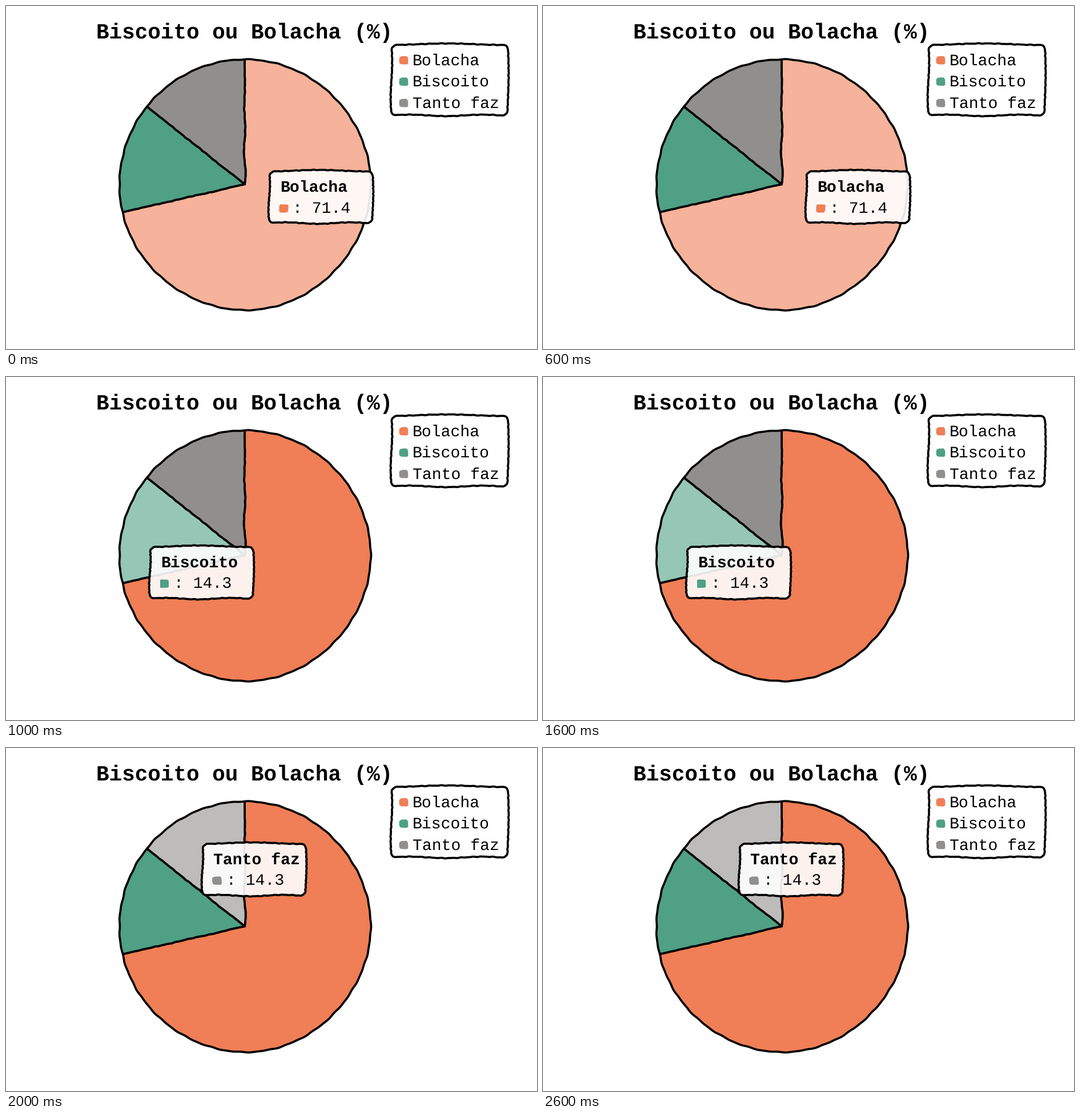
Animation, 930 px wide and 602 px high, one loop 3000 ms. Source, as a matplotlib script:

```python
import numpy as np
import matplotlib.pyplot as plt
from matplotlib.animation import FuncAnimation
from matplotlib.colors import to_rgb
from matplotlib.patches import Polygon

W, H, DPI = 930, 602, 64
PX = 72 / DPI  # points per pixel
LINE = 3.7
CX, CY, R = 418, 313, 219
TAU = 2 * np.pi

plt.rcParams["toolbar"] = "None"
plt.rcParams["text.hinting"] = "no_hinting"
fig = plt.figure(figsize=(W / DPI, H / DPI), dpi=DPI, facecolor="white")
ax = fig.add_axes([0, 0, 1, 1])
ax.set_xlim(0, W)
ax.set_ylim(H, 0)
ax.axis("off")


def shape(points, face, outlined=True):
    return ax.add_patch(Polygon(points, closed=True, facecolor=face, joinstyle="round",
                                edgecolor="black" if outlined else "none",
                                linewidth=LINE * PX if outlined else 0))


def write(text, x, y, size=28.15, weight="normal"):
    return ax.text(x, y, text, family="Liberation Mono", weight=weight,
                   size=size * PX, va="baseline", zorder=1)


# --- Hand-drawn shapes ---

def tremble(t):
    return 0.3 * np.sin(70 * t) + 0.2 * np.sin(113 * t)


def box(x0, y0, x1, y1, alpha=1.0, r=9):
    """Rounded box whose four sides wave gently."""
    a = np.linspace(0, TAU, 81)
    cx = np.where(np.cos(a) > 0, x1 - r, x0 + r)
    cy = np.where(np.sin(a) > 0, y1 - r, y0 + r)
    ring_x, ring_y = cx + r * np.cos(a), cy + r * np.sin(a)
    # even steps put enough points on the straight sides to bend them
    dist = np.r_[0, np.cumsum(np.hypot(np.diff(ring_x), np.diff(ring_y)))]
    s = np.arange(0, dist[-1])
    x, y = np.interp(s, dist, ring_x), np.interp(s, dist, ring_y)
    u, v = (x - x0) / (x1 - x0), (y - y0) / (y1 - y0)
    dx = (1 - u) * np.sin(TAU * v) + u * np.sin(4 * v)
    dy = (1 - v) * np.cos(6.6 * u) - v * np.sin(10 * u)
    points = np.column_stack([x + 1.3 * dx + tremble(v), y + 1.3 * dy + tremble(u)])
    return shape(points, (1, 1, 1, alpha))


def swatch(cx, cy, color, rx=7.4, ry=7.2):
    a = np.linspace(0, TAU, 80)
    c, s = np.cos(a), np.sin(a)
    x = cx + rx * np.sign(c) * np.abs(c) ** 0.4 + 0.5 * np.sin(3 * a + cy)
    y = cy + ry * np.sign(s) * np.abs(s) ** 0.4 + 0.5 * np.cos(2 * a + cx)
    return shape(np.column_stack([x, y]), color, outlined=False)


def rim(turn):
    """Points on the rough circle, clockwise from the top."""
    a = TAU * np.asarray(turn)
    lower_right = (1 + np.cos(a - 0.75 * np.pi)) / 2
    r = (R + lower_right * (1 + 1.2 * np.cos(4 * (a - 1.5)))
         + 0.4 * np.sin(29 * a) + 0.3 * np.sin(53 * a))
    return np.column_stack([CX + r * np.sin(a), CY - r * np.cos(a)])


def spoke(turn, bend):
    """Line from the centre to the rim, its wave fading outwards."""
    t = np.linspace(0, 1, 110)[:, None]
    a = TAU * turn
    wave = bend * (1 - t) * np.sin(17.5 * t) + np.sin(np.pi * t) * tremble(t)
    return (CX, CY) + t * (rim([turn]) - (CX, CY)) + wave * (np.cos(a), np.sin(a))


# --- Chart ---

LABELS = ["Bolacha", "Biscoito", "Tanto faz"]
SHARES = np.array([5, 1, 1]) / 7
COLORS = [to_rgb(c) for c in ("#f07e56", "#4fa085", "#918f8d")]
TIP_AT = [(461, 289), (252, 297), (344, 167)]

starts = np.cumsum(SHARES) - SHARES
spokes = [spoke(turn, bend) for turn, bend in zip(starts, (1.8, 0.5, 0.5))]

slices = []
for i, color in enumerate(COLORS):
    arc = rim(np.linspace(starts[i], starts[i] + SHARES[i], 400))
    slices.append(shape(np.vstack([spokes[i], arc, spokes[(i + 1) % 3][::-1]]), color))

write("Biscoito ou Bolacha (%)", 158.3, 57, size=37.6, weight="bold")

box(675, 67, 879, 192)
for i, (label, color) in enumerate(zip(LABELS, COLORS)):
    y = 95.5 + 37.5 * i
    swatch(696.5, y, color)
    write(label, 711.5, y + 8)


def tooltip(i):
    x, y = TIP_AT[i]
    return [box(x, y, x + 181, y + 92, alpha=0.9),
            write(LABELS[i], x + 19, y + 37, weight="bold"),
            swatch(x + 25.5, y + 66, COLORS[i], rx=8),
            write(f": {100 * SHARES[i]:.1f}", x + 41.5, y + 74)]


tips = [tooltip(i) for i in range(3)]


def draw(active):
    for i, color in enumerate(COLORS):
        faded = [0.6 * c + 0.4 for c in color]
        slices[i].set_facecolor(faded if i == active else color)
        for artist in tips[i]:
            artist.set_visible(i == active)
    return slices + sum(tips, [])


anim = FuncAnimation(fig, draw, frames=3, interval=1000, repeat=True, repeat_delay=0)
plt.show()
```
